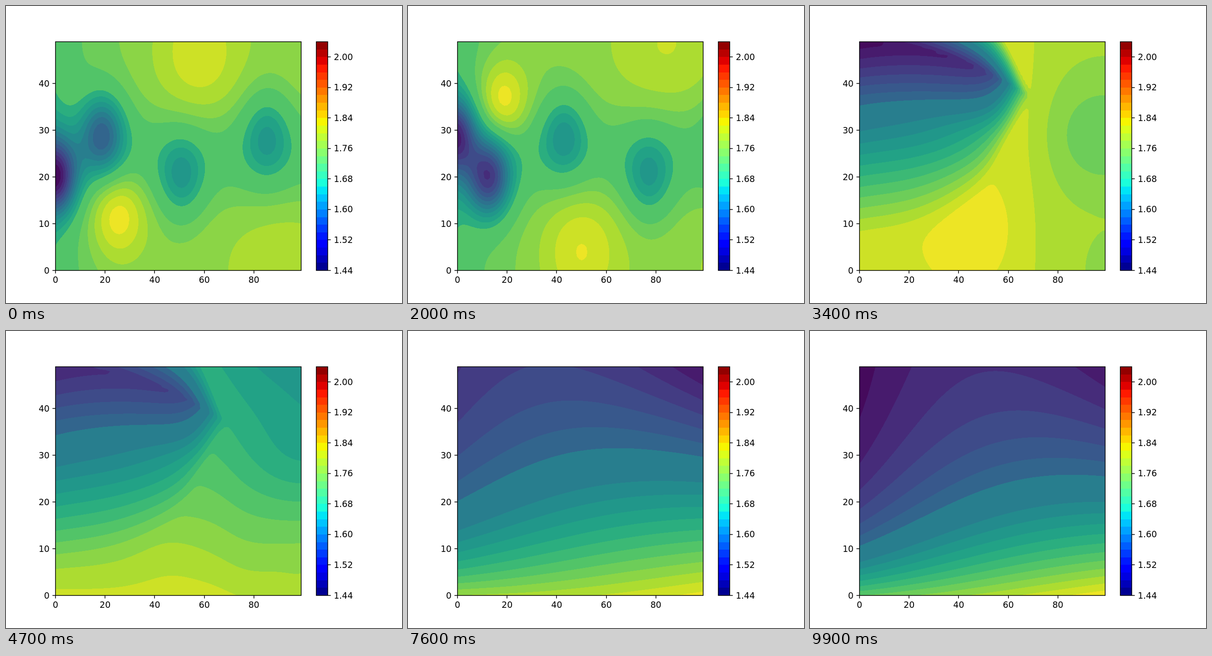
An HTML page with a canvas for the animation above (10000 ms loop, 864 by 648 pixels).

```html
<!DOCTYPE html>
<html>
<head>
<meta charset="utf-8">
<style>
html, body { margin: 0; width: 100%; height: 100%; overflow: hidden; background: #fff; }
canvas { position: absolute; left: 108px; top: 78px; }
svg { position: absolute; left: 0; top: 0; font: 18.75px "DejaVu Sans", sans-serif; }
</style>
</head>
<body>
<canvas width="536" height="499"></canvas>
<svg width="864" height="648"></svg>
<script>
const W = 536, H = 499, COLS = 100, ROWS = 50, MID = 24.5;
const { exp, abs, floor, round } = Math;
const mod1 = v => v - floor(v);
const mix = (a, b, t) => a + (b - a) * t;
const clamp = (v, lo, hi) => Math.min(hi, Math.max(lo, v));
const sigmoid = v => 1 / (1 + exp(-v));
const bell = (x, y, cx, cy, wx, wy) => exp(-(((x - cx) / wx) ** 2) - ((y - cy) / wy) ** 2);

// Vortex street. Ages count in shedding periods; all field values are in colour bands.
const PERIODS_PER_FRAME = 2.03 / 12;
const travel = age => age < 0 ? 6 * age : 70 * age - 20 + 20 * exp(-3.2 * age);

function low(age, side) {
  const growth = age < 0 ? exp(-((age / 0.3) ** 2)) : 1;
  const depth = 4.2 + 7.5 / (1 + (age / 0.5) ** 6);
  const d = 4.7;
  return [-depth * growth, travel(age), MID + side * d, 8.5 + age, 8 + age];
}

function high(age, side) {
  if (age <= 0) return [0, 0, 0, 1, 1];
  const growth = 1 / (1 + (0.3 / age) ** 6), late = Math.max(0, age - 0.5);
  const d = 24 - 12.5 * exp(-((late / 0.45) ** 2));
  return [4.6 * growth * exp(-1.1 * late), travel(age), MID + side * d,
    10 + 12 * late, Math.min(14, 8.5 + 10 * late)];
}

function street(i) {
  const cells = [];
  for (const side of [-1, 1])
    for (let k = -1; k < 2; k++) {
      const age = k + mod1(i * PERIODS_PER_FRAME + (side > 0 ? 0.5 : 0));
      cells.push(low(age, side), high(age + 0.6, side));
    }
  return (x, y) => {
    let v = 16.5 - 2.2 * exp(-(((y - MID) / 10) ** 2)) - 3 * exp(-x / 15);
    for (const [amount, ...shape] of cells) v += amount * bell(x, y, ...shape);
    return v / 20;
  };
}

// Dark tongue entering from the upper left, over a bright surrounding
function surge(x, y) {
  const u = 49 - 4 * (x / 40) ** 2 - y;
  const across = u < 0 ? -1.3 * u
    : 0.44 * u * (1 + 0.65 * (x / 55) ** 3) + 0.7 * exp(-(((u - 13) / 6) ** 2));
  const tongue = 0.3 + 0.04 * x + 20 * sigmoid((x - 64) / 4.8) + across;
  const around = 18.9 - 1.7 * sigmoid((x - 70) / 5)
    + 0.8 * bell(x, y, 45, 9, 15, 9)
    - 2.2 * bell(x, y, 98, 29, 20, 11)
    - 0.6 * bell(x, y, 99, 0, 8, 7);
  const k = 0.6, m = Math.min(tongue, around);
  return (m - k * Math.log(exp((m - tongue) / k) + exp((m - around) / k))) / 20;
}

// Calm layers: values at bottom, middle and top for the left, centre and right
function layers(bands, ...sides) {
  const profile = ([a, b, c], t) => {
    const r = (c - b) / (b - a);
    return a + (b - a) * (1 - r ** t) / (1 - r);
  };
  return (x, y) => {
    const [l, m, r] = sides.map(s => profile(s, y / MID)), t = x / 49.5 - 1;
    return (m + t * (r - l) / 2 + t * t * ((l + r) / 2 - m)) / bands;
  };
}
const calmA = layers(21, [18.4, 9, 4.5], [18.65, 10.25, 4.8], [20.1, 10.15, 1]);
const calmB = layers(20, [16.6, 3.4, 1.5], [17.95, 7.3, 3.3], [19.7, 8.1, 0.7]);
const calmC = layers(20, [14.95, 2.6, 0.45], [17.3, 6.5, 2.9], [19.75, 7.35, 1.2]);

const blend = (a, b, t) => (x, y) => mix(a(x, y), b(x, y), t);

function field(i) {
  if (i < 26) return street(i);
  if (i < 34) return blend(street(i), surge, (i - 26) / 8);
  if (i < 64) return blend(surge, calmA, (i - 34) / 30);
  if (i < 88) return blend(calmA, calmB, (i - 64) / 24);
  return blend(calmB, calmC, (i - 88) / 11);
}

// Band count, followed by the bands that share the colour of the next one
const banding = i => i < 6 ? [20, 13] : i < 16 ? [20, 12] : i < 27 ? [20, 13]
  : i < 49 ? [20, 7] : i < 76 ? [21, 6, 13] : [20, 7];

const viridis = [[68,1,84], [72,36,117], [65,68,135], [53,95,141], [42,120,142], [33,145,140],
  [34,168,132], [68,191,112], [122,209,81], [189,223,38], [253,231,37]];

function shade(u) {
  const k = floor(u * 10);
  const [r, g, b] = viridis[k].map((v, j) => round(mix(v, viridis[k + 1][j], u * 10 - k)));
  return (255 << 24 | b << 16 | g << 8 | r) >>> 0;
}

const ctx = document.querySelector('canvas').getContext('2d');
const image = ctx.createImageData(W, H);
const pixels = new Uint32Array(image.data.buffer);
const grid = new Float32Array(COLS * ROWS);

function paint(i) {
  const value = field(i), [n, ...shared] = banding(i);
  const colors = Array.from({ length: n }, (_, k) => shade((k + (shared.includes(k) ? 1.5 : 0.5)) / n));
  for (let k = 0; k < grid.length; k++)
    grid[k] = value(k % COLS, ROWS - 1 - floor(k / COLS));
  for (let y = 0; y < H; y++) {
    const gy = (y + 0.5) * (ROWS - 1) / H, r = floor(gy), fy = gy - r;
    for (let x = 0; x < W; x++) {
      const gx = (x + 0.5) * (COLS - 1) / W, c = floor(gx), fx = gx - c, k = r * COLS + c;
      const v = mix(mix(grid[k], grid[k + 1], fx), mix(grid[k + COLS], grid[k + COLS + 1], fx), fy);
      pixels[y * W + x] = colors[clamp(floor(v * n), 0, n - 1)];
    }
  }
  ctx.putImageData(image, 0, 0);
}

// Axes and colour bar
const LEFT = 108, TOP = 77.76, BOTTOM = 576.72, BAR = 677, BAR_END = 702;
const ramp = (u, a, b, c, d, lo, hi) => u < c
  ? mix(lo, 1, clamp((u - a) / (b - a), 0, 1))
  : mix(1, hi, clamp((u - c) / (d - c), 0, 1));
const jet = u => [
  u < 0.35 ? 0 : ramp(u, 0.35, 0.66, 0.89, 1, 0, 0.5),
  ramp(u, 0.125, 0.375, 0.64, 0.91, 0, 0),
  ramp(u, 0, 0.11, 0.34, 0.65, 0.5, 0)
].map(v => round(v * 255));
const text = (x, y, anchor, s) => `<text x="${x}" y="${y}" text-anchor="${anchor}">${s}</text>`;

let svg = '', ticks = '';
const step = (BOTTOM - TOP) / 30;
for (let k = 0; k < 30; k++)
  svg += `<rect x="${BAR}" y="${BOTTOM - (k + 1) * step}" width="${BAR_END - BAR}" height="${step + 0.3}" fill="rgb(${jet((k + 0.5) / 30)})" shape-rendering="crispEdges"/>`;
for (let v = 0; v <= 80; v += 20) {
  const x = LEFT + v * 535.68 / 99;
  ticks += `M${round(x)} 577v6.6`;
  svg += text(x, 604, 'middle', v);
}
for (let v = 0; v <= 40; v += 10) {
  const y = BOTTOM - v * (BOTTOM - TOP) / 49;
  ticks += `M${LEFT} ${round(y)}h-6.6`;
  svg += text(95, round(y + 6.8), 'end', v);
}
for (let k = 0; k < 8; k++) {
  const y = BOTTOM - k * 4 * step;
  ticks += `M${BAR_END} ${round(y)}h6.6`;
  svg += text(715.2, round(y + 6.8), 'start', (1.44 + k * 0.08).toFixed(2));
}
svg += `<path d="${ticks}M${LEFT} 78H644V577H${LEFT}ZM${BAR} 78H${BAR_END}V577H${BAR}Z" fill="none" stroke="#000" stroke-width="1.5"/>`;
document.querySelector('svg').innerHTML = svg;

const start = performance.now();
let shown = -1;
function tick() {
  const i = floor((performance.now() - start) / 100) % 100;
  if (i !== shown) paint(shown = i);
  requestAnimationFrame(tick);
}
tick();
</script>
</body>
</html>
```
